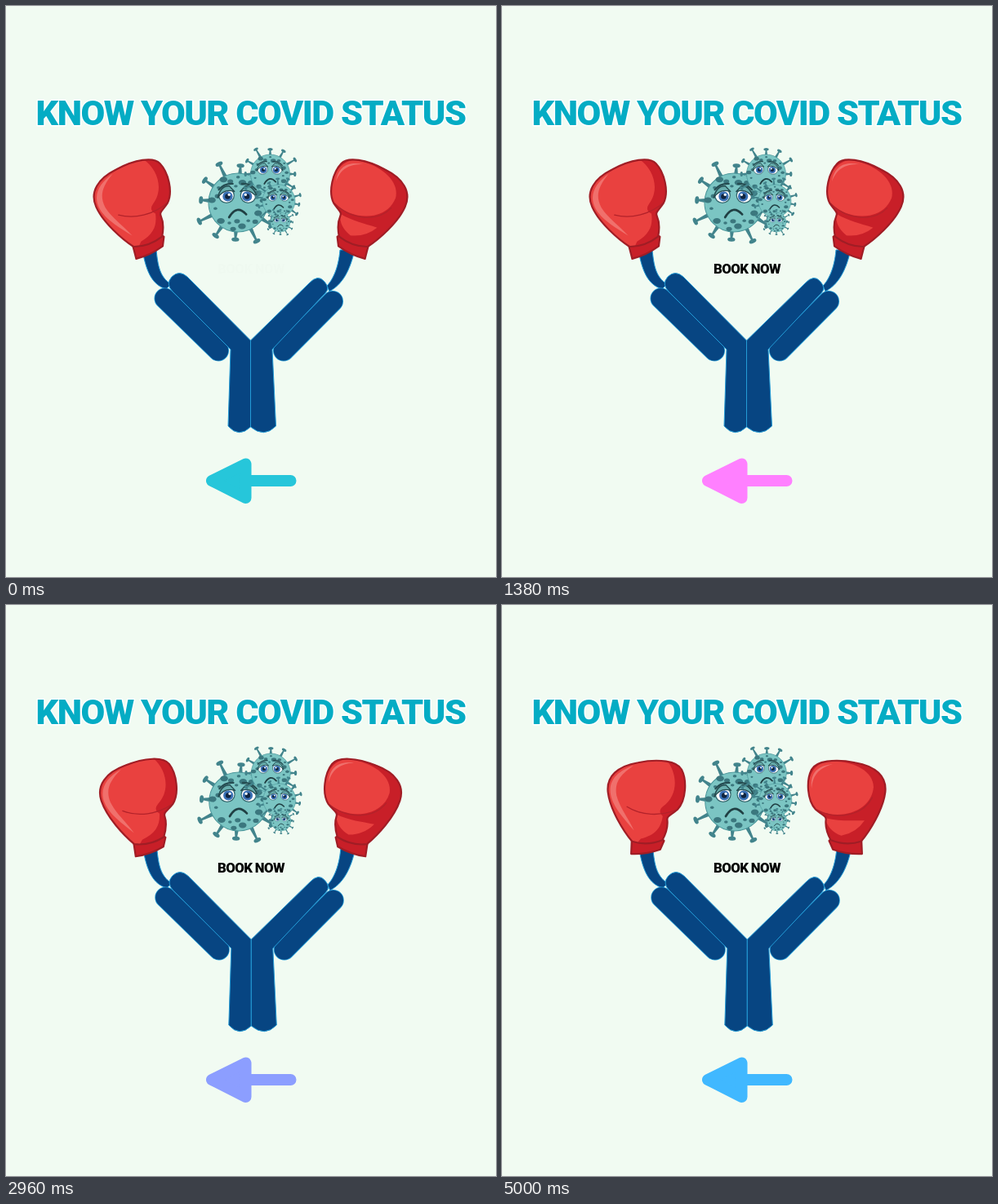
An HTML page for the animation above (5.04 s loop, 600 by 700 pixels).

```html
<!DOCTYPE html>
<html lang="en">
<head>
<meta charset="utf-8">
<style>
html, body { margin: 0; width: 100%; height: 100%; overflow: hidden; background: #f1fbf2; }
svg { display: block; width: 600px; height: 700px; }
text { font-family: Roboto, "Open Sans", sans-serif; font-weight: 900; font-stretch: 84%; letter-spacing: -.035em; text-anchor: middle; }
#title { fill: #04acc4; stroke: #fff; stroke-width: 3px; paint-order: stroke; stroke-linejoin: round; }
.chain { fill: #074582; stroke: #239bd6; stroke-width: 1; stroke-linejoin: round; }
.rim, .core { fill: none; stroke-linecap: round; stroke: #239bd6; stroke-width: 26; }
.core { stroke: #074582; stroke-width: 24.4; }
.edge { fill: none; stroke: #a01d25; stroke-width: 2.2; stroke-linejoin: round; }
.crease { fill: none; stroke: #b3222a; stroke-width: 1.3; stroke-linecap: round; }
</style>
</head>
<body>
<svg viewBox="0 0 600 700">
  <defs>
    <path id="fist" d="M161 288C152 274 139 246 139 225C139 205 155 194 180 193C206 191 228 197 232 208C237 222 233 246 221 256C212 262 207 262 207 267C207 277 203 284 198 291Q178 296 161 288Z"/>
    <path id="cuff" d="M161 285Q180 293 196 287L200 292L194 302Q176 306 158 303Z"/>
    <clipPath id="inside"><use href="#fist"/></clipPath>
  </defs>
  <text id="title" x="299.5" y="146">KNOW YOUR COVID STATUS</text>
  <text id="book" x="300" y="328">BOOK NOW</text>
  <g id="scene">
    <g id="viruses"></g>
    <path class="chain" d="M167 299C172 328 180 342 196 347L202 341C188 332 186 318 184 299Z"/>
    <path class="chain" d="M409 299C407 323 399 337 393 343L396 350C412 341 421 325 427 299Z"/>
    <path class="rim" d="M194.5 358.5L260 422.5M400 362L340 422.5"/>
    <path class="core" d="M194.5 358.5L260 422.5M400 362L340 422.5"/>
    <path class="chain" d="M299.5 410L222 332Q212 323 203 332Q195 341 204 350L275 421L272 515Q285 530 299.5 516Z"/>
    <path class="chain" d="M299.5 410L371 340Q382 328 390 338Q397 346 391 352L326 421L330.5 515Q316 530 299.5 516Z"/>
  </g>
  <g id="left">
    <use href="#cuff" fill="#c81f28"/><use href="#cuff" class="edge"/>
    <g clip-path="url(#inside)">
      <use href="#fist" fill="#e9413f"/>
      <path fill="#cb2029" d="M212 190C227 208 226 238 204 250Q196 255 202 262C198 276 190 284 172 286L160 297H245V190Z"/>
      <path fill="#f0706c" d="M142 228C141 210 154 200 174 196C156 205 148 214 149 230C151 245 159 257 165 275C153 257 143 243 142 228Z"/>
    </g>
    <path class="crease" d="M160 245C176 258 199 262 220 256"/>
    <use href="#fist" class="edge"/>
  </g>
  <g id="right">
    <g transform="matrix(-1 0 0 1 599 0)">
      <use href="#cuff" fill="#c81f28"/><use href="#cuff" class="edge"/>
      <g clip-path="url(#inside)">
        <use href="#fist" fill="#c81f28"/>
        <path fill="#e9413f" d="M154 220C157 200 184 190 214 196C240 203 238 242 221 256C190 267 153 250 154 220Z"/>
        <path fill="#e9413f" d="M208 265C190 267 176 264 160 262Q168 278 186 284Q203 280 208 265Z"/>
        <path fill="#f0706c" d="M229 231C234 211 224 202 207 198C223 205 230 214 229 231Z"/>
      </g>
      <path class="crease" d="M220 256C192 267 162 255 154 233"/>
      <use href="#fist" class="edge"/>
    </g>
  </g>
  <path id="arrow" d="M252 582L293.5 561.5V603Z M293 582H348.5" stroke-width="14" stroke-linejoin="round" stroke-linecap="round"/>
</svg>
<script>
const $ = id => document.getElementById(id);
const DURATION = 5040, TICK = 1000 / 24;

// Choose the font size at which a line fills its width
function fit(id, width) {
  const line = $(id);
  line.style.fontSize = '100px';
  line.style.fontSize = 100 * width / line.getComputedTextLength() + 'px';
}
fit('title', 526);
fit('book', 82);

function virus(x, y, r, spikes, turn, hasFace) {
  let s = `<g transform="translate(${x} ${y}) scale(${r})">`;
  for (let i = 0; i < spikes; i++) {
    const len = 1.26 + .1 * (i % 3);
    s += `<g transform="rotate(${turn + i * 360 / spikes})" fill="#42848c">
      <path d="M.95 -.07L${len} -.03V.03L.95 .07Z"/>
      <ellipse cx="${len}" rx=".07" ry=".13"/></g>`;
  }
  s += '<circle r="1" fill="#7bc5c3" stroke="#4b979b" stroke-width=".03"/>';
  for (let i = 0; i < 42; i++) {
    const d = Math.sqrt((i + .5) / 42) * .93, a = i * 2.4;
    const px = d * Math.cos(a), py = d * Math.sin(a);
    if (hasFace && Math.abs(px) < .62 && py > -.5 && py < .56) continue;
    const size = .055 + .03 * (i % 3);
    s += `<ellipse cx="${px}" cy="${py}" rx="${size * 1.15}" ry="${size * .85}" fill="#3b777e"/>`;
  }
  return s + (hasFace ? face() : '') + '</g>';
}

function face() {
  const eye = side => `<g transform="translate(${side * .37 - .02} -.24) scale(${side} 1)">
    <ellipse rx=".26" ry=".25" fill="#fff" stroke="#32666c" stroke-width=".035"/>
    <circle cx="-.04" cy=".03" r=".17" fill="#3970b5"/>
    <circle cx="-.04" cy=".03" r=".09" fill="#10243f"/>
    <circle cx="-.09" cy="-.03" r=".045" fill="#fff"/>
    <path d="M-.28 -.13Q.08 -.26 .3 .08Q.2 -.34 -.1 -.32Z" fill="#68afae" stroke="#254c51" stroke-width=".04"/>
    <path d="M-.24 -.4Q.08 -.43 .28 -.18" fill="none" stroke="#254c51" stroke-width=".06"/></g>`;
  return eye(-1) + eye(1) +
    '<path d="M-.3 .5Q-.04 .05 .28 .4" fill="none" stroke="#203f43" stroke-width=".075" stroke-linecap="round"/>';
}

$('viruses').innerHTML =
  virus(284, 241, 36, 12, 4, true) + virus(323.5, 206, 24, 12, 0, true) +
  virus(334, 239, 20, 14, 10, true) + virus(336, 265, 12, 12, 0, true);

// End of each pose as a share of the swing, and its angle
const poses = [[.25, -24], [.38, -18], [.48, -13], [.58, -7], [.85, 0], [.91, -7], [.96, -13], [1, -18]];
const colors = ['#26c6da', '#4fdcaa', '#80f08a', '#c8f070', '#ffd760', '#ffb070',
  '#ff8a80', '#ff7eb2', '#ff80ff', '#c58cff', '#8c9eff', '#40b8ff'];

function draw(now) {
  const t = now % DURATION, tick = t / TICK;
  const swing = tick % 31 / 31;
  const angle = poses.find(p => swing < p[0])[1];
  $('left').setAttribute('transform', `rotate(${angle} 175 303)`);
  $('right').setAttribute('transform', `rotate(${-angle} 424 303)`);
  $('scene').setAttribute('transform', `translate(${angle === -24 ? 0 : .8} 0)`);

  const shade = tick % 12.05;
  const color = colors[Math.max(0, Math.floor(shade - .2))];
  $('arrow').setAttribute('fill', color);
  $('arrow').setAttribute('stroke', color);
  $('book').setAttribute('opacity', Math.min(1, t / 400));
}

const start = performance.now();
function loop() {
  draw(performance.now() - start);
  requestAnimationFrame(loop);
}
loop();
</script>
</body>
</html>
```
